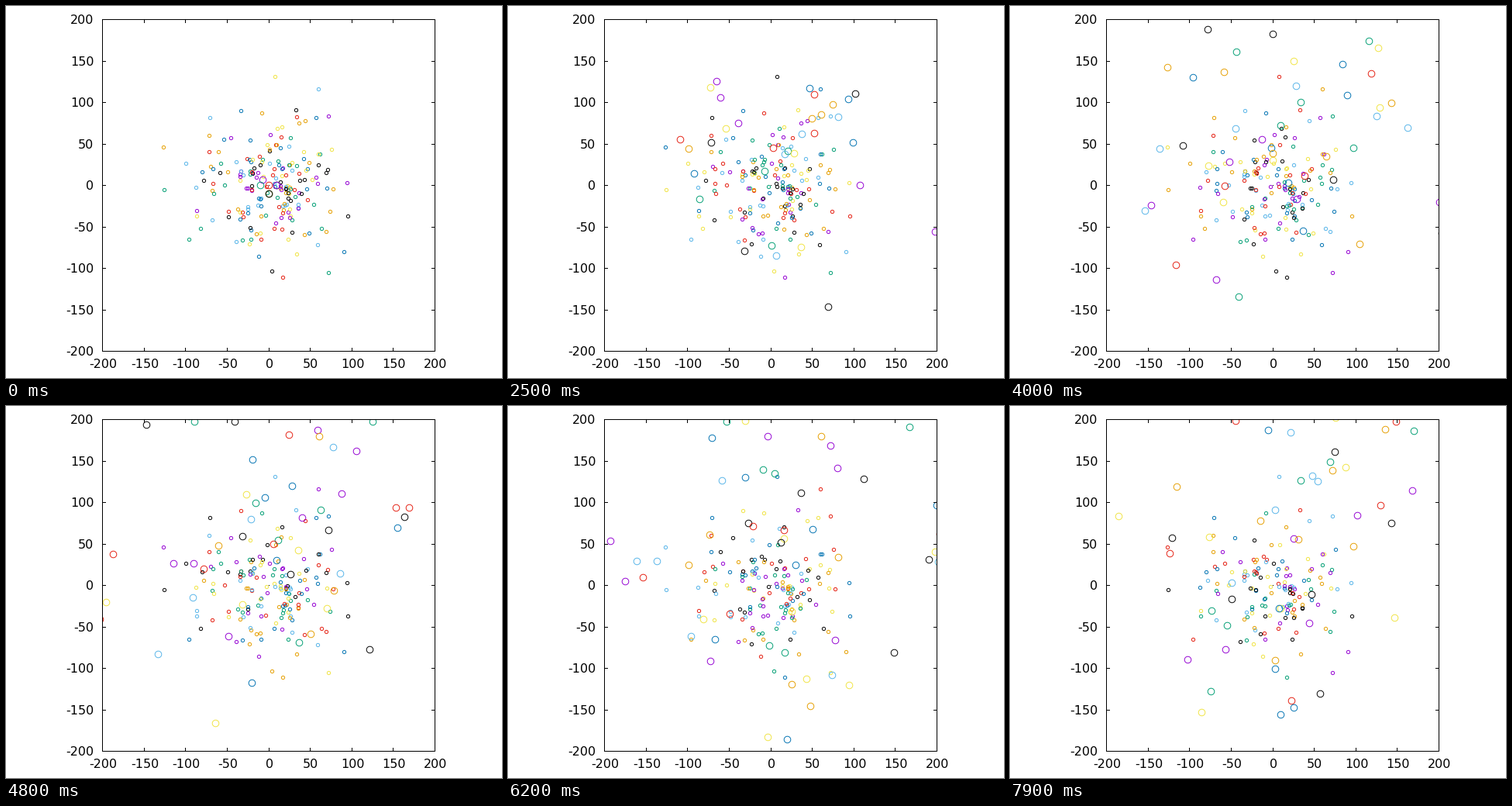
Recreate the animation shown at these times as a matplotlib script. Size 640 by 480 pixels, loop 8 s.

```python
import math
import numpy as np
import matplotlib.pyplot as plt
from matplotlib.animation import FuncAnimation
from matplotlib.patches import Rectangle

FRAMES, DPI = 80, 100
PX = 72 / DPI
L, R, T, B = 124.5, 553.5, 17.5, 445.5
PALETTE = np.array(["#9400d3", "#009e73", "#56b4e9", "#e69f00",
                    "#f0e442", "#0072b2", "#e51e10", "#000000"])
DOTS, SPREAD = 200, 45
STEP, BIRTHS, EATING, OUTWARD = 10, 0.95, 0.63, 0.4

rng = np.random.default_rng(11)


def scatter_dots():
    dots = []
    while len(dots) < DOTS:
        x, y = rng.normal(0, SPREAD, 2)
        if -130 < x < 117 and -122 < y < 136:
            dots.append((round(x), round(y)))
    return np.array(dots)


def direction(heading):
    a = heading % 8 * math.pi / 4
    return math.cos(a), math.sin(a)


def move(pos, heading):
    return [p + round(STEP * d) for p, d in zip(pos, direction(heading))]


def turn(pos, heading):
    """Turn by up to 90 degrees, sometimes preferring the way out."""
    options = [heading + int(d) for d in rng.integers(-2, 3, 2)]
    if rng.random() < OUTWARD:
        return max(options, key=lambda h: np.dot(pos, direction(h)))
    return options[0]


def simulate(dots):
    """Walkers split as they spread; most splits use up the nearest dot."""
    heads = [3, 4, 6, 0, 6, 0, 2, 6, 0]
    walkers = [move((0, 0), h) for h in heads]
    walkers[6] = [0, 0]
    start = len(walkers)
    end = np.full(DOTS, FRAMES)
    history = [np.array(walkers)]
    for t in range(1, FRAMES):
        heads = [turn(p, h) for p, h in zip(walkers, heads)]
        walkers = [move(p, h) for p, h in zip(walkers, heads)]
        while len(walkers) < start + BIRTHS * t:
            who = int(rng.integers(len(walkers)))
            if rng.random() < EATING:
                food = np.flatnonzero(end == FRAMES)
                gap = np.linalg.norm(np.array(walkers)[:, None] - dots[food],
                                     axis=2)
                who, what = np.unravel_index(gap.argmin(), gap.shape)
                end[food[what]] = t
            heads.append(heads[who] + int(rng.integers(2, 7)))
            walkers.append(move(walkers[who], heads[-1]))
        history.append(np.array(walkers))
    return history, end


def to_px(points):
    """Data units to the centre of the nearest stage pixel."""
    x, y = np.asarray(points, float).T
    return np.floor(np.column_stack([
        (L + R) / 2 + x * (R - L) / 400,
        (T + B) / 2 - y * (B - T) / 400])) + 0.5


dots = scatter_dots()
spots = to_px(dots)
history, end = simulate(dots)

fig = plt.figure(figsize=(640 / DPI, 480 / DPI), dpi=DPI, facecolor="white")
ax = fig.add_axes([0, 0, 1, 1])
ax.set_xlim(0, 640)
ax.set_ylim(480, 0)
ax.axis("off")


def stroke(xs, ys):
    ax.plot(xs, ys, color="black", lw=PX, snap=False, zorder=5,
            solid_capstyle="butt", solid_joinstyle="miter")


def label(x, y, value, align):
    ax.text(x, y, str(value), ha=align, va="baseline", family="DejaVu Sans",
            size=16 * PX)


stroke([L, R, R, L, L], [T, T, B, B, T])
for v in range(-200, 201, 50):
    x, y = to_px([(v, v)])[0]
    for edge, d in ((T, 4.5), (B, -4.5)):
        stroke([x, x], [edge, edge + d])
    for edge, d in ((L, 4.5), (R, -4.5)):
        stroke([edge, edge + d], [y, y])
    label(113.5, y + 5.5, v, "right")
    label(x + 0.8, 467, v, "center")

ax.add_patch(Rectangle((339, 231), 1, 1, color="black", lw=0))
stage = Rectangle((L, T), R - L, B - T, transform=ax.transData)


def rings(diameter):
    c = ax.scatter([], [], s=(diameter * PX) ** 2, facecolors="none",
                   edgecolors="black", linewidths=0.95 * PX)
    c.set_clip_path(stage)
    return c


small, big = rings(4.3), rings(8.6)


def draw(t):
    # Colours cycle through everything still drawn, dots first.
    left = spots[end > t]
    crowd = to_px(history[t])
    hues = PALETTE[np.arange(len(left) + len(crowd)) % len(PALETTE)]
    small.set_offsets(left)
    small.set_edgecolors(hues[:len(left)])
    big.set_offsets(crowd)
    big.set_edgecolors(hues[len(left):])
    return small, big


anim = FuncAnimation(fig, draw, frames=FRAMES, interval=100,
                     repeat=True, repeat_delay=0, blit=False)
plt.show()
```
